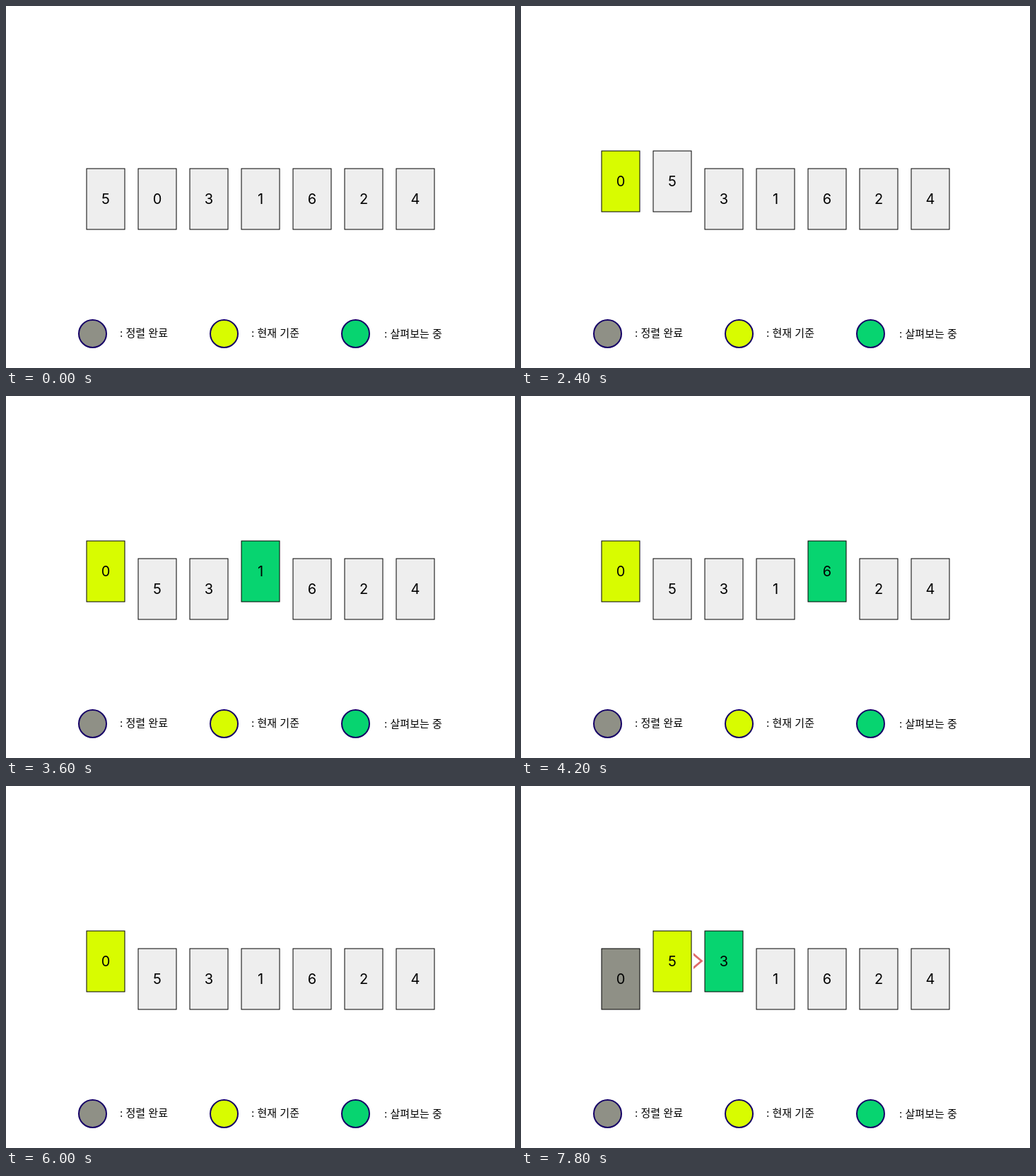
An HTML page for the animation above (8 s loop, 720 by 512 pixels).

```html
<!DOCTYPE html>
<html lang="ko">
<head>
<meta charset="utf-8">
<title>선택 정렬</title>
<style>
  html, body { margin: 0; width: 100%; height: 100%; overflow: hidden; background: #fff; }
  svg { display: block; }
  text { font-family: Inter, "Noto Sans CJK KR", "Noto Sans CJK", sans-serif; }
  .card { stroke: #000; stroke-width: 1; }
  .digit { font-size: 20px; text-anchor: middle; }
  .dot { stroke: #150066; stroke-width: 2; }
  .label { font-size: 15px; }
</style>
</head>
<body>
<svg width="720" height="512" viewBox="0 0 720 512"><g id="cards"></g><g id="legend"></g></svg>
<script>
const STEP = 600, LOOP = 8000;
const PLAIN = '#eee', DONE = '#8f9086', PIVOT = '#d8fc00', LOOK = '#07d470';
// Index of the card being examined in each step, -1 for none
const looks = [-1, -1, 1, 1, 1, 2, 3, 4, 5, 6, -1, -1, -1, 2];

function card(digit, i, fill, raised) {
  const x = 114 + 73 * i, y = raised ? 205 : 230;
  return `<rect class="card" x="${x}" y="${y}" width="54" height="86" fill="${fill}"/>
    <text class="digit" x="${x + 27}" y="${y + 50}">${digit}</text>`;
}

function chevron(i) {
  return `<path transform="translate(${171 + 73 * i} 236)" fill="#df6b6b"
    d="M0 0L13.6 11.5L0 23V19.2L9.3 11.5L0 3.8Z"/>`;
}

function scene(step) {
  const pivot = step < 1 ? -1 : step < 12 ? 0 : 1;
  const look = looks[step], swapped = step === 4;
  const digits = step < 4 ? '5031624' : '0531624';
  const cards = [...digits].map((digit, i) => {
    const fill = i < pivot ? DONE : i === pivot ? PIVOT
      : i === look && !swapped ? LOOK : PLAIN;
    return card(digit, i, fill, i === pivot || i === look);
  });
  if (step === 3 || step === 13) cards.push(chevron(pivot));
  return cards.join('');
}

function legend(fill, label, cx, x, y) {
  return `<circle class="dot" cx="${cx}" cy="463.5" r="19.5" fill="${fill}"/>
    <text class="label" x="${x}" y="${y}">: ${label}</text>`;
}

document.getElementById('legend').innerHTML =
  legend(DONE, '정렬 완료', 122.5, 161, 468) +
  legend(PIVOT, '현재 기준', 308.5, 347, 468) +
  legend(LOOK, '살펴보는 중', 494.5, 535, 469);

const cards = document.getElementById('cards');
let shown = -1;
function draw() {
  const step = Math.floor(performance.now() % LOOP / STEP);
  if (step !== shown) cards.innerHTML = scene(shown = step);
  requestAnimationFrame(draw);
}
draw();
</script>
</body>
</html>
```
